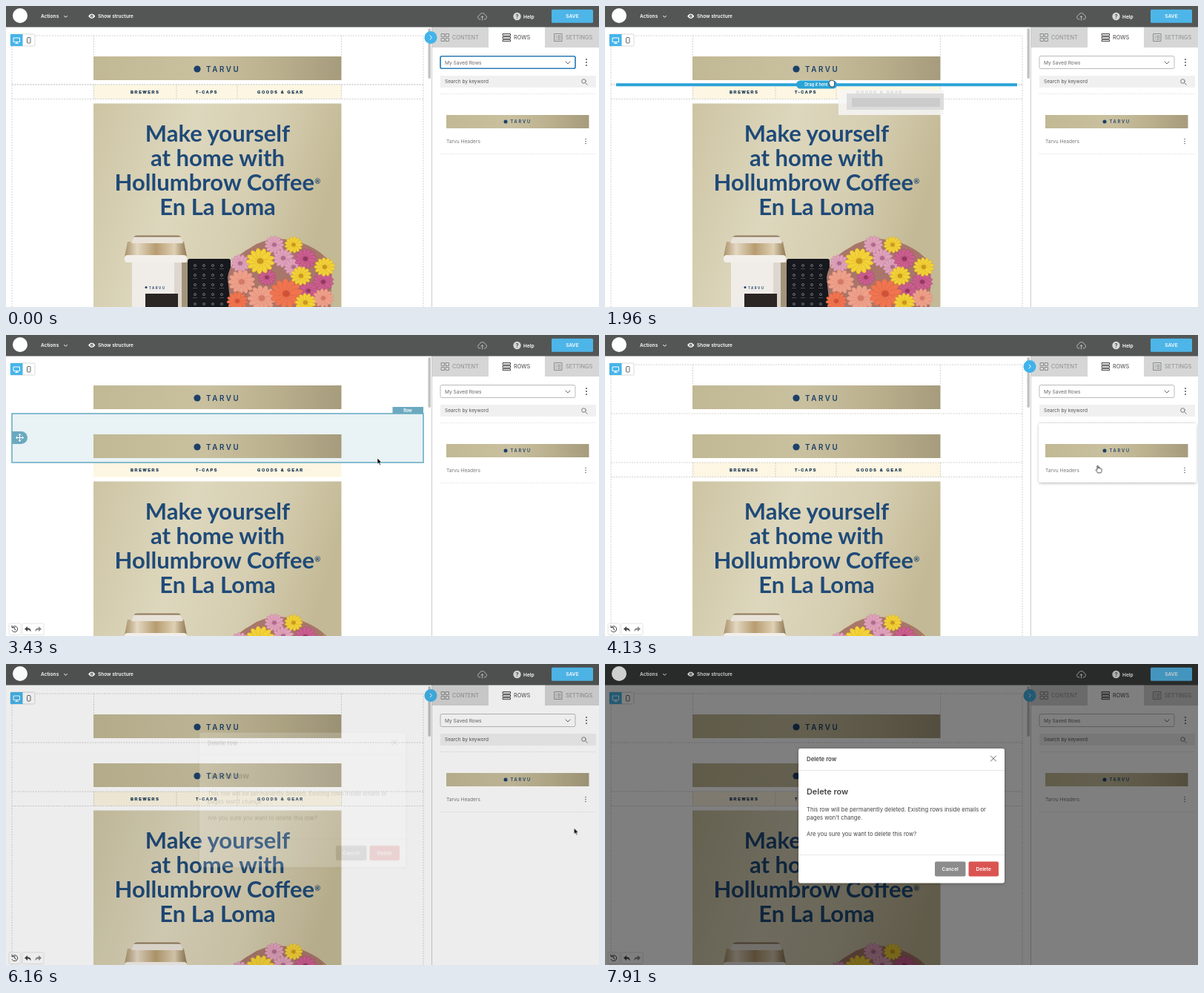
Recreate the animation shown at these times as an HTML page. Size 800 by 406 pixels, loop 8.12 s.

```html
<!DOCTYPE html>
<html lang="en">
<head>
<meta charset="utf-8">
<title>Saved rows</title>
<style>
html, body { margin: 0; width: 100%; height: 100%; overflow: hidden; background: #fff; }
svg { display: block; width: 100%; height: 100%; }
text { font-family: Inter, sans-serif; font-size: 6.6px; fill: #666; }
.white { fill: #fff; }
.semi { font-weight: 600; }
.tab { font-size: 7.3px; fill: #8a8c8c; }
.brand { font-size: 9.8px; font-weight: 600; letter-spacing: 2.6px; fill: #1c4068; }
.nav text { font: 700 5.4px "Liberation Sans", Arial, sans-serif; letter-spacing: 1.7px; fill: #12304f; stroke: #12304f; stroke-width: .25; }
.headline text { font: 700 31px Lato, sans-serif; text-anchor: middle; fill: #1f4a78; }
.grid { fill: none; stroke: #c6c6c6; stroke-width: .8; stroke-dasharray: 2 1.5; }
.line { fill: none; stroke: #666; stroke-linecap: round; stroke-linejoin: round; }
.body text { font-size: 7.6px; fill: #444; }
</style>
</head>
<body>
<svg viewBox="0 0 800 406" preserveAspectRatio="none">
<defs>
  <linearGradient id="bar">
    <stop stop-color="#c1b894"/><stop offset=".45" stop-color="#c9c09f"/><stop offset=".75" stop-color="#b9af8d"/><stop offset="1" stop-color="#a69c7d"/>
  </linearGradient>
  <linearGradient id="sand" x2="1" y2=".25">
    <stop stop-color="#cdc4a3"/><stop offset=".4" stop-color="#ddd7bd"/><stop offset=".7" stop-color="#d6ceb1"/><stop offset="1" stop-color="#c3b996"/>
  </linearGradient>
  <linearGradient id="lid">
    <stop stop-color="#a98f66"/><stop offset=".2" stop-color="#e3d8c2"/><stop offset=".5" stop-color="#b79c70"/><stop offset=".8" stop-color="#ded0b4"/><stop offset="1" stop-color="#8f7650"/>
  </linearGradient>
  <pattern id="keys" x="250" y="346" width="12" height="13" patternUnits="userSpaceOnUse">
    <circle cx="5" cy="4" r="1.5" fill="none" stroke="#a4a8b0" stroke-width=".6"/>
    <path d="M2 8.5h6" stroke="#5c606a" stroke-width=".7"/>
  </pattern>
  <filter id="soft" x="-20%" y="-20%" width="140%" height="150%">
    <feDropShadow dx="0" dy="1" stdDeviation="2.2" flood-opacity=".25"/>
  </filter>
  <clipPath id="stage"><path d="M0 28H574V406H0z"/></clipPath>
  <g id="header">
    <path d="M118 68h334.500v32H118z" fill="url(#bar)"/>
    <circle cx="258" cy="85" r="4.600" fill="#1c4068"/>
    <text class="brand" x="270" y="88.500">TARVU</text>
  </g>
  <g id="kebab" fill="#555"><circle cy="-4" r="1"/><circle r="1"/><circle cy="4" r="1"/></g>
</defs>

<rect width="800" height="406" fill="#fff"/>
<g clip-path="url(#stage)">
  <path class="rowbox" d="M8 106H563V172H8z" fill="#e9f2f4"/>
  <use href="#header"/>
  <use id="copy" href="#header" y="66"/>
  <path class="grid" d="M8 406V40H563V406M8 106H563M118.500 40V68M452.500 40V68"/>
  <g id="lower">
    <g class="nav">
      <path d="M118 106h334.500v19.500H118z" fill="#fdf6e2"/>
      <text x="168" y="118">BREWERS</text>
      <text x="256" y="118">T-CAPS</text>
      <text x="339" y="118">GOODS &amp; GEAR</text>
    </g>
    <path class="grid" d="M8 106H563M8 125.500H563M230 106v19M312 106v19M118.500 106v19M452.500 106v19"/>
    <path d="M118 131.500h334.500V406H118z" fill="url(#sand)"/>
    <g class="headline">
      <text x="285.500" y="183">Make yourself</text>
      <text x="285.500" y="216">at home with</text>
      <text x="285.500" y="249">Hollumbrow Coffee<tspan font-size="10" dy="-9">®</tspan></text>
      <text x="285.500" y="282">En La Loma</text>
    </g>
    <g>
      <path d="M236 346h10v60h-10z" fill="#a3957a"/>
      <path d="M170 340h67v66h-67z" fill="#f0ece8"/>
      <path d="M227 344h10v62h-10z" fill="#ddd7d0"/>
      <path d="M188 388h44v18h-44z" fill="#2b2523"/>
      <path d="M164 318h76l4 20H160z" fill="url(#lid)"/>
      <path d="M172 313q1-3.500 5-3.500h54q4 0 5 3.500l3 7h-70z" fill="#e8e2d8"/>
      <path d="M172 311.500q2-2 5-2h54q4 0 5 2z" fill="#8d7757"/>
      <rect x="160" y="336" width="84" height="10" rx="4" fill="#f2eee9"/>
      <circle cx="189" cy="379.500" r="1.500" fill="#1c4068"/>
      <text class="brand" x="193" y="381.500" style="font-size:4.400px;letter-spacing:1.500px">TARVU</text>
      <rect x="245" y="341" width="58" height="70" rx="3" fill="#16181d"/>
      <path d="M250 346h50v60h-50z" fill="url(#keys)"/>
      <g id="flowers"></g>
    </g>
  </g>

  <g id="target">
    <path d="M15 106.200H556" stroke="#2aa3d6" stroke-width="4"/>
    <rect x="258" y="100.500" width="55" height="11" rx="5.500" fill="#2aa3d6"/>
    <text class="white semi" x="285" y="108" text-anchor="middle" style="font-size:5.600px">Drag it here</text>
  </g>
  <g class="rowbox">
    <path d="M8 106H563V172H8z" fill="none" stroke="#62a9c2" stroke-width="1.500"/>
    <path d="M521.500 97H563v9h-41.500z" fill="#6ba9c0"/>
    <text class="white semi" x="542" y="104" text-anchor="middle" style="font-size:5.600px">Row</text>
    <path d="M8 130h12.500a8.500 8.500 0 0 1 0 17H8z" fill="#6ba9c0"/>
    <path class="line" style="stroke:#fff" d="M13.500 138.500h10M18.500 133.500v10M17 135l1.500-1.500 1.500 1.500M17 142l1.500 1.500 1.500-1.500M15 137l-1.500 1.500 1.500 1.500M22 137l1.500 1.500-1.500 1.500"/>
  </g>

  <rect x="569.500" y="30" width="3.500" height="68" rx="1.700" fill="#c3c3c3"/>
  <rect x="6" y="38" width="33" height="16" rx="1.500" fill="#fff" stroke="#d0d0d0" stroke-width=".8"/>
  <path d="M6 38h16.500v16H6z" fill="#45b5ea"/>
  <path class="line" style="stroke:#fff" d="M10.500 43h8v5.500h-8zM14.500 48.500v2M12.500 50.500h4"/>
  <rect class="line" x="28.500" y="42.500" width="4.500" height="7.500" rx="1"/>
  <g id="history">
    <g fill="#fff" stroke="#ddd" stroke-width=".8">
      <rect x="4" y="389" width="16" height="15.500" rx="1.500"/><rect x="22" y="389" width="29" height="15.500" rx="1.500"/>
    </g>
    <path class="line" style="stroke:#444" d="M8.300 394.500a4 4 0 1 1-.2 4M8 392v2.700h2.700M11.700 394.500v2.500l1.700 1"/>
    <path d="M25 396.500l4-3.500v2.200q5 0 4.500 5.300q-1.300-3-4.500-3v2.500z" fill="#444"/>
    <path d="M48 396.500l-4-3.500v2.200q-5 0-4.500 5.300q1.300-3 4.500-3v2.500z" fill="#888"/>
  </g>
</g>

<g id="panel">
  <path d="M574.500 28V406" stroke="#ccc"/>
  <path d="M575 28h76v28h-76zM727 28h73v28h-73z" fill="#d6d6d6"/>
  <path class="line" style="stroke:#8a8c8c" d="M587.500 37.500h4v4h-4zM593.500 37.500h4v4h-4zM587.500 43.500h4v4h-4zM593.500 43.500h4v4h-4zM740 37.500h10v10h-10zM742 40.500h.5M744.500 40.500h3.500M742 42.700h.5M744.500 42.700h3.500M742 45h.5M744.500 45h3.500"/>
  <path class="line" style="stroke:#444" d="M670.500 37.500h10v2.500h-10zM670.500 41.500h10v2.500h-10zM670.500 45.500h10v2.200h-10z"/>
  <text class="tab" x="602" y="45">CONTENT</text>
  <text class="tab" x="685" y="45" style="fill:#444">ROWS</text>
  <text class="tab" x="755" y="45">SETTINGS</text>
  <rect x="586" y="67.500" width="182" height="17" rx="2" fill="#fff" stroke="#bbb"/>
  <rect id="focus" x="586" y="67.700" width="182" height="16.600" rx="2" fill="none" stroke="#2b7db8" stroke-width="1.600"/>
  <text x="592" y="78.500">My Saved Rows</text>
  <path class="line" d="M755 75l3 3 3-3"/>
  <use href="#kebab" x="783" y="76"/>
  <path d="M586 94h210v16H586z" fill="#f0f0f0"/>
  <text x="592" y="104.300" style="fill:#555;font-size:6.500px">Search by keyword</text>
  <g class="line" style="stroke:#777"><circle cx="779.500" cy="101.500" r="2.800"/><path d="M781.800 103.800l2.500 2.500"/></g>
  <path d="M586 118.500h210M586 199.500h210" stroke="#d9d9d9" stroke-width=".8" stroke-dasharray="1.500 1.500"/>
  <rect id="hover" x="585.500" y="119" width="212.500" height="80" rx="2" fill="#fff" filter="url(#soft)"/>
  <path d="M594 147h192.500v18H594z" fill="url(#bar)"/>
  <circle cx="674" cy="156" r="2.500" fill="#1c4068"/>
  <text class="brand" x="680.500" y="158.100" style="font-size:5.600px;letter-spacing:1.900px">TARVU</text>
  <text x="594" y="185" style="fill:#777">Tarvu Headers</text>
  <use href="#kebab" transform="translate(782 182.500) scale(.75)"/>
  <g id="menu">
    <rect x="748" y="192" width="41" height="43" rx="2" fill="#fff" filter="url(#soft)"/>
    <text x="755.500" y="207" style="fill:#444">Edit Info</text>
    <text x="755.500" y="225" style="fill:#c9302c">Delete</text>
  </g>
</g>
<g id="toggle">
  <circle cx="573" cy="42.500" r="8.500" fill="#42b3ea"/>
  <path class="line" style="stroke:#fff" d="M572 40l2.500 2.500-2.500 2.500"/>
</g>

<path d="M0 0h800v28.500H0z" fill="#535655"/>
<rect id="shade" width="800" height="406"/>
<g id="top">
  <circle cx="19" cy="13" r="10" fill="#fff"/>
  <text class="white semi" x="47" y="16.200">Actions</text>
  <path class="line" style="stroke:#fff" d="M78.500 13.300l2 2 2-2"/>
  <path d="M111 13.700q4.700-6.400 9.400 0q-4.700 6.400-9.400 0z" fill="#fff"/>
  <circle cx="115.700" cy="13.700" r="1.900" fill="#535655"/><circle cx="115.700" cy="13.700" r=".8" fill="#fff"/>
  <text class="white semi" x="124" y="16.200" style="font-size:6.500px">Show structure</text>
  <path class="line" style="stroke:#b5b7b6" d="M640 18h-1a2.800 2.800 0 0 1-.2-5.500a4 4 0 0 1 7.600-.3a3 3 0 0 1-.4 5.800h-1M642.500 19v-5.500M640.700 15.200l1.800-1.800 1.800 1.800"/>
  <circle cx="689.500" cy="14" r="5.200" fill="#d6d8d7"/>
  <text class="semi" x="689.500" y="16.700" text-anchor="middle" style="font-size:7.500px;fill:#444">?</text>
  <text class="white semi" x="698" y="16.500">Help</text>
  <rect x="736" y="4.800" width="56" height="18" rx="1.500" fill="#4db5e8"/>
  <text class="white semi" x="764" y="16.200" text-anchor="middle">SAVE</text>
</g>

<g id="modal">
  <rect x="261" y="114" width="278" height="181.500" rx="3" fill="#fff" filter="url(#soft)"/>
  <path d="M261 143.500h278M261 257.500h278" stroke="#e3e3e3" stroke-width=".8"/>
  <text class="semi" x="272" y="131" style="font-size:7.800px;fill:#444">Delete row</text>
  <path class="line" d="M520.500 124l7 7M527.500 124l-7 7"/>
  <text class="semi" x="272" y="176.300" style="font-size:10.900px;fill:#444">Delete row</text>
  <g class="body">
    <text x="272" y="198.500">This row will be permanently deleted. Existing rows inside emails or</text>
    <text x="272" y="209.700">pages won't change.</text>
    <text x="272" y="232">Are you sure you want to delete this row?</text>
  </g>
  <rect x="445" y="266.500" width="41.500" height="20" rx="2" fill="#8c8c8c"/>
  <rect x="490.500" y="266.500" width="40.500" height="20" rx="2" fill="#da5552"/>
  <text class="white semi" x="465.700" y="279" text-anchor="middle">Cancel</text>
  <text class="white semi" x="510.700" y="279" text-anchor="middle">Delete</text>
</g>

<g id="cursor">
  <g id="ghost">
    <path d="M9 9h142v34H9z" fill="#f6f6f6" fill-opacity=".86"/>
    <path d="M20 14h131v22H20z" fill="#dcdcdc"/>
    <path d="M27 20h119v12H27z" fill="#cbcbcb"/>
  </g>
  <path id="arrow" d="M0 0V8L1.900 6.400 3.200 9.300 4.500 8.700 3.200 6H5.700z" fill="#000" stroke="#fff" stroke-width=".6"/>
  <path id="hand" d="M-.8.8Q0-.6.800.8V4Q2-.1 2.700 4.200 4 3.200 4.200 4.700 5.500 4 5.500 5.500V7.500L4.500 10H0L-2.600 6.300Q-2.300 5-.8 6.200z" fill="#fff" stroke="#222" stroke-width=".8" stroke-linejoin="round"/>
  <path id="grab" d="M-3.300-1.500Q-3-4.200-1.400-3Q-.8-4.800.5-3.300Q1.600-4.200 2.200-2.700Q3.800-3 3.700-1V2L2.500 5H-1.500L-3.800 1Q-4.200-.6-3.300-1.500z" fill="#fff" stroke="#222" stroke-width=".8" stroke-linejoin="round"/>
</g>
</svg>
<script>
const LOOP = 8120;
const all = sel => document.querySelectorAll(sel);

function flower([x, y, r, fill, heart]) {
  let out = '';
  for (let i = 0; i < 13; i++) {
    out += `<ellipse cx="${r * .6}" rx="${r * .42}" ry="${r * .2}" transform="rotate(${i * 360 / 13 + x})"/>`;
  }
  return `<g transform="translate(${x} ${y}) scale(1 .9)" fill="${fill}" stroke="${heart}" stroke-width=".3">${out}
    <circle r="${r * .22}" fill="${heart}"/></g>`;
}

const yellow = ['#f2d238', '#c9971f'];
const pink = ['#dfa3bb', '#b06a8c'];
const rose = ['#cb5f90', '#94395f'];
const coral = ['#ef7550', '#cf5238'];
const peach = ['#eda08a', '#d47a66'];

document.getElementById('flowers').innerHTML =
  '<path d="M303 406L299 366Q303 340 330 326Q352 310 388 316Q425 326 440 350L438 406z" fill="#a8766a"/>' + [
    [316, 347, 13, ...pink], [362, 322, 13, ...pink], [374, 340, 14, ...pink], [388, 352, 13, ...pink],
    [404, 341, 15, ...rose], [428, 372, 14, ...rose], [408, 384, 13, ...rose], [352, 366, 12, ...rose],
    [318, 372, 18, ...peach], [345, 394, 19, ...peach], [428, 394, 14, ...peach],
    [378, 388, 22, ...coral], [312, 398, 14, ...coral],
    [343, 344, 19, ...yellow], [388, 322, 12, ...yellow], [430, 352, 14, ...yellow],
    [398, 364, 14, ...yellow], [404, 400, 14, ...yellow],
  ].map(flower).join('');

// Each step: [ms, properties, easing to the next step]
function play(sel, steps, ease = 'linear') {
  const frames = steps.map(([ms, props, easing = ease]) => ({ offset: ms / LOOP, easing, ...props }));
  all(sel).forEach(el => el.animate(frames, { duration: LOOP, iterations: Infinity }));
}

// Hard on/off at the given times
function toggle(sel, on, ...times) {
  const steps = [0, ...times, LOOP].map((ms, i, list) => {
    const lit = (Math.min(i, list.length - 2) % 2 === 0) === on;
    return [ms, { opacity: lit ? 1 : 0 }];
  });
  play(sel, steps, 'steps(1, end)');
}

const move = (x, y) => ({ transform: `translate(${x}px, ${y}px)` });

toggle('#focus', true, 1260);
toggle('#hover', false, 560, 1260, 4130, 5670);
toggle('#toggle', true, 1260, 3920);
toggle('#ghost', false, 1260, 2310);
toggle('#grab', false, 1260, 2310);
toggle('#hand', false, 560, 1260, 4130, 6160);
toggle('#arrow', true, 560, 2310, 4130, 6160);
toggle('#target', false, 1540, 2310);
toggle('#copy', false, 2520);
toggle('#history', false, 2520);
toggle('.rowbox', false, 2520, 3920);
toggle('.grid', true, 2520, 3920);
toggle('#menu', false, 4690, 6160);

play('#lower', [[0, move(0, 0)], [2520, move(0, 66)], [LOOP, move(0, 66)]], 'steps(1, end)');

play('#cursor', [
  [0, 815, 150], [490, 815, 150], [980, 685, 158], [1260, 685, 158],
  [1890, 306, 104], [2700, 306, 104], [3360, 501, 166], [3710, 501, 166],
  [4480, 783, 183], [5460, 783, 183], [5880, 766, 221], [6130, 766, 221],
  [6300, 771, 225], [6400, 771, 225], [6800, 815, 250], [LOOP, 815, 250],
].map(([ms, x, y]) => [ms, move(x, y)]), 'ease-in-out');

play('#shade', [[0, { opacity: 0 }], [6130, { opacity: 0 }], [6300, { opacity: .38 }],
  [6440, { opacity: .5 }], [LOOP, { opacity: .5 }]]);
play('#top', [[0, { opacity: 1 }], [6130, { opacity: 1 }], [6440, { opacity: .78 }], [LOOP, { opacity: .78 }]]);
play('#modal', [
  [0, { opacity: 0, ...move(0, -25) }],
  [6130, { opacity: 0, ...move(0, -25) }],
  [6300, { opacity: .96, ...move(0, -6) }, 'ease-out'],
  [6440, { opacity: 1, ...move(0, 0) }],
  [LOOP, { opacity: 1, ...move(0, 0) }],
]);
</script>
</body>
</html>
```
